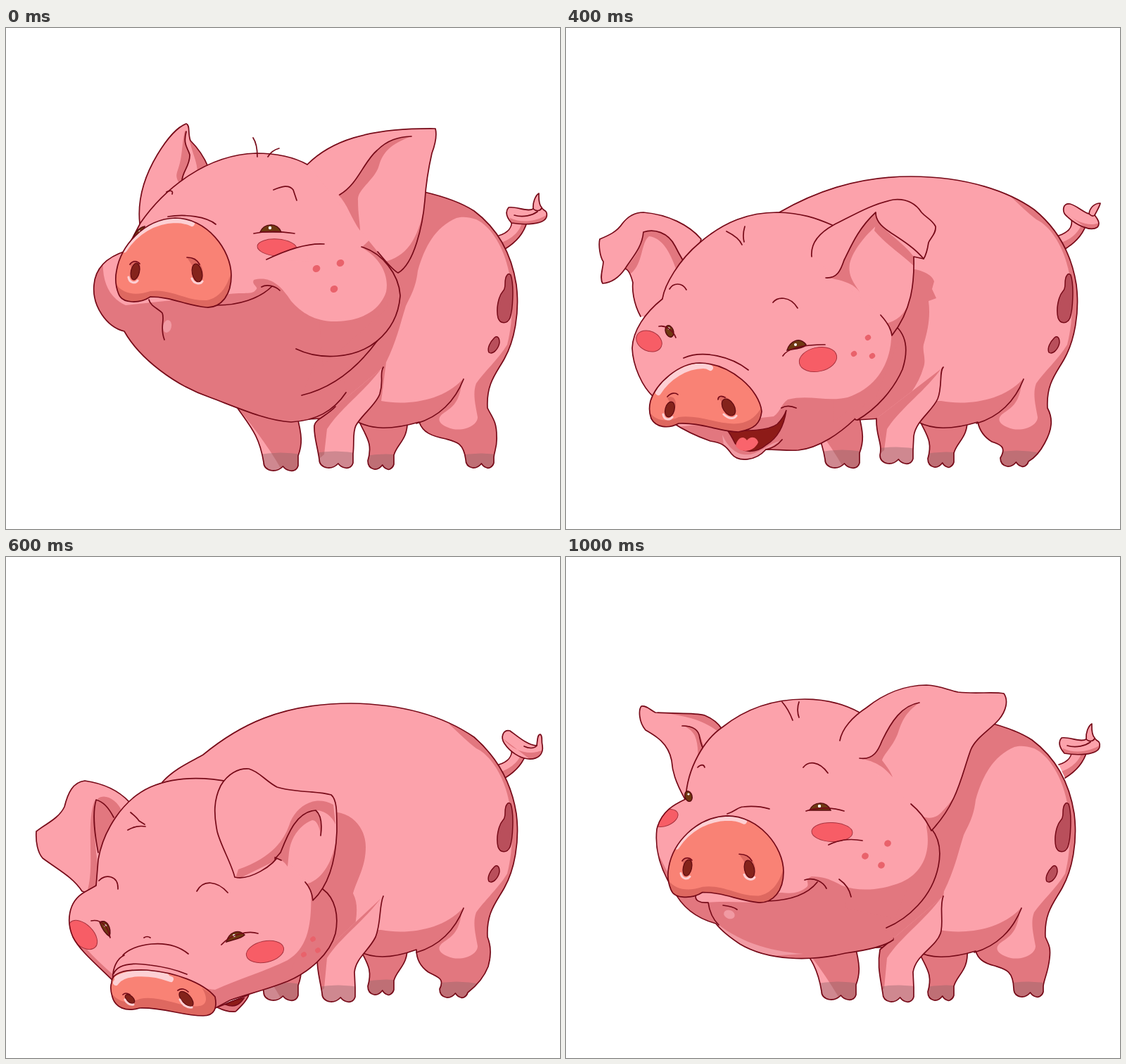
Write an HTML page that moves like this. It is 787 px wide and 712 px high and loops after 1200 ms.

```html
<!DOCTYPE html>
<html lang="en">
<head>
<meta charset="utf-8">
<title>Pig</title>
<style>
html, body { margin: 0; width: 100%; height: 100%; overflow: hidden; background: #fff; }
#strip { display: block; width: 4722px; height: 712px; animation: roll 1.2s steps(6) infinite; }
@keyframes roll { to { transform: translateX(-4722px); } }
.l { fill: #fca2ab; }
.d { fill: #e2777f; }
.k { fill: none; stroke: #760a18; stroke-width: 1.7; stroke-linecap: round; stroke-linejoin: round; }
.h { fill: #8b6367; opacity: .4; }
.spot { fill: #b94f5b; stroke: #760a18; stroke-width: 1.5; }
.blush { fill: #f75d66; stroke: #a8323e; stroke-width: 1; }
.freckle { fill: #e9626b; }
.eye { fill: #6f3912; stroke: #5a0c10; stroke-width: 1.5; }
.nose { fill: #f98275; }
.under { fill: #de6860; }
.hole { fill: #84231b; stroke: #650c12; stroke-width: 1.3; }
.mouth { fill: #8d1b18; stroke: #760a18; stroke-width: 1.5; }
.tongue { fill: #f9646c; }
.glint { fill: #fff; }
.pale { fill: #f19aa3; }
.shine { fill: none; stroke: #fdd0d4; stroke-width: 8; stroke-linecap: round; }
.curve { fill: none; stroke: #fdd0d4; stroke-width: 3; stroke-linecap: round; }
</style>
</head>
<body>
<svg id="strip" viewBox="0 0 4722 712"></svg>
<script>
let clips = 0;
const path = (c, d) => `<path class="${c}" d="${d}"/>`;
const ell = (c, x, y, rx, ry = rx, r = 0) =>
  `<ellipse class="${c}" cx="${x}" cy="${y}" rx="${rx}" ry="${ry}" transform="rotate(${r} ${x} ${y})"/>`;
const move = (x, y, s) => `<g transform="translate(${x} ${y})">${s}</g>`;

// Filled shapes with clipped shading; only the first two get an outline.
function part(base, shapes, shade = '') {
  const id = 'c' + clips++;
  const fills = shapes.map(d => path('', d)).join('');
  return `<clipPath id="${id}">${fills}</clipPath><g class="${base}">${fills}</g>` +
    `<g clip-path="url(#${id})">${shade}</g>` + path('k', shapes.slice(0, 2).join(''));
}

// Cloven foot, drawn from right to left.
const foot = (r, l, y) => {
  const w = r - l;
  return `L${r} ${y}c-2 7 -8 8 ${-.24 * w} 7q${-.12 * w} -1 ${-.2 * w} -6` +
    `q${-.14 * w} 7 ${-.32 * w} 6q${-.24 * w} -2 ${-.24 * w} -12`;
};
const hoof = (x, y) => path('h', `M${x} ${y}q35 -7 70 0v40h-70z`);
const freckles = (r, ...pts) => pts.map(([x, y]) => ell('freckle', x, y, r, r * .9, -30)).join('');

const farLeg = part('d',
  ['M413 550C421 580 421 592 415 608' + foot(415, 366, 622) + 'C359 575 345 565 322 530'],
  path('l', 'M322 530C345 560 375 595 398 640H350z') + hoof(355, 607));
const backLeg = part('d',
  ['M570 555C572 585 556 590 551 607' + foot(551, 514, 620) + 'C522 588 510 580 500 555'], hoof(505, 609));

const spots = path('spot', 'M712 351C706 358 712 368 706 374C699 382 696 400 699 412C702 421 712 421 716 412C720 400 722 365 717 351Q714 348 712 351Z') +
  path('spot', 'M694 440C688 446 683 455 686 461C692 465 700 455 701 447C701 440 698 437 694 440Z');

const stem = part('l', ['M700 295C713 291 720 283 718 272L740 276C736 290 727 303 709 314'],
  path('d', 'M734 270C733 290 715 302 700 306L715 320L745 275Z'));
const curls = {
  a: ['M714 255C708 262 712 270 718 277C735 280 765 280 768 268C770 258 762 260 761 255C756 250 757 240 757 235C752 238 748 248 749 257C740 262 725 253 714 255Z',
    'M716 270C735 279 757 273 769 265L765 282H715Z', 'M749 257C753 261 759 260 761 256M722 266C735 270 748 266 755 261'],
  b: ['M716 250C705 248 704 262 712 268C725 280 745 290 755 283C760 277 754 270 751 266C754 260 758 254 759 249C750 249 744 256 743 264C735 262 725 252 716 250Z',
    'M708 262C725 275 742 283 757 277L750 292Z', 'M743 264C746 267 749 268 751 266'],
  c: ['M716 247C706 245 702 256 708 265C716 277 730 286 742 287C756 288 764 280 762 268C760 260 763 255 759 252C755 252 755 260 754 268C742 268 728 256 716 247Z',
    'M706 258C722 277 745 283 763 274L750 292Z', 'M754 268C750 273 742 272 736 269']
};
const tail = (kind, x, y) => {
  const [d, shade, line] = curls[kind];
  return stem + move(x, y, part('l', [d], path('d', shade)) + path('k', line));
};

const HIGH = 'M560 228L594 233C620 239 645 247 665 260';
const MID = 'M303 262C350 235 410 211 490 211C570 211 630 233 665 258';
const LOW = 'M222 320C240 300 265 290 280 281C330 240 390 208 490 208C560 209 620 225 665 256';
const RUMP = 'C697 284 718 320 725 365C730 405 722 445 708 470C697 490 682 505 684 540';
const BELLY = 'C545 572 520 570 500 560L500 552L412 557L390 540';
const LIT = 'C570 537 620 530 648 500C645 525 640 535 625 545C608 555 615 565 635 570C655 573 670 563 670 553' +
  'C668 540 662 520 668 505C678 490 700 470 712 450C722 410 720 370 714 345C708 315 690 282 668 272';
const SHADED = 'M668 272C655 268 648 268 640 270C610 283 595 310 585 345C582 370 575 380 568 395C560 420 555 445 540 475L533 530';
const OPEN = 'M668 272C655 262 645 252 630 238V200H200V530H533';

function body(top, hind, hoofAt, cast) {
  return part('d', [top + RUMP + hind + BELLY],
    path('l', (cast ? OPEN : SHADED) + LIT + 'Z') + (cast ? path('d', cast) : '') + hoof(...hoofAt)) +
    path('k', 'M650 499C638 530 615 553 583 562') + spots;
}
const nearLeg = (right, r, l, y, left) => part('l',
  ['M536 482' + right + foot(r, l, y) + left],
  path('d', `M430 550L536 480C512 515 475 540 456 570L452 ${y - 12}L438 ${y}Z`) + hoof(l - 12, y - 13));

// Muzzle seen from below
const muzzle = part('nose',
  ['M157 345C163 310 195 272 240 270C285 270 320 315 320 352C320 380 305 398 285 397C255 394 235 382 205 382C190 392 165 392 160 378C156 368 155 355 157 345Z'],
  path('under', 'M155 362C165 379 185 381 205 374C235 370 255 388 285 387C302 384 313 370 319 350L325 405H150Z') +
  path('shine', 'M168 315C184 290 210 274 240 273C250 273 258 275 264 278')) +
  path('under', 'M176 336C180 326 192 330 191 342L186 357ZM257 326C272 322 284 342 279 358L266 340Z') +
  ell('hole', 183.5, 346, 6, 12, 12) + ell('hole', 271.5, 348, 7, 13, -12) +
  path('curve', 'M174 354C175 362 183 364 187 359M264 356C267 364 276 365 279 360') +
  path('k', 'M176 336C180 330 187 331 190 335M257 326C266 326 272 330 275 336');

const lidEye = path('eye', 'M361 290C366 277 385 276 391 290Z') + ell('glint', 375, 284, 2.2);

function headUp() {
  const farEar = part('l',
    ['M190 278C186 240 200 205 215 180C230 155 245 140 256 136C262 138 258 150 262 160C272 170 282 185 287 197L250 250'],
    path('d', 'M254 146C249 170 251 182 244 202C241 210 242 214 246 220L252 216C250 205 262 195 261 180C258 170 253 165 257 148ZM260 157C265 180 272 190 272 206L292 197Z')) +
    path('k', 'M256 147C251 165 258 170 261 180C262 195 250 205 250 217');
  const face = part('d', [
    'M483 518C465 545 440 558 405 560C370 558 330 540 290 525C240 508 190 470 168 431C143 425 122 395 125 365C127 340 145 325 170 317L191 277C225 228 285 180 355 178C385 178 410 184 428 194',
    'M505 311C535 320 558 350 560 380C558 410 545 430 527 445C505 475 470 510 420 522',
    'M428 194L560 250L556 347L540 400L450 480Z'],
    path('l', 'M138 325C135 365 150 385 170 394L318 378C335 375 350 380 355 372C360 368 348 365 352 358C375 352 390 365 405 388C420 405 440 418 470 417C500 416 530 405 540 375C545 350 530 325 505 312L570 250V150H180Z') +
    ell('pale', 229, 424, 6, 9, 12) + ell('blush', 385, 312, 28, 12, 4) +
    path('l', 'M370 329C385 321 400 315 425 309L430 332Z') + freckles(5.5, [441, 342], [475, 334], [466, 371])) +
    lidEye + path('eye', 'M180 303C180 292 190 283 197 282L194 291C190 298 185 300 180 303Z') + ell('glint', 190, 289, 1.5) +
    path('k', 'M352 292C375 287 395 290 410 292M370 329C395 317 425 305 452 307M380 230C392 225 402 222 408 230L413 245M228 233C233 230 238 231 236 236M357 183C357 170 355 162 351 156M372 183C376 176 381 173 388 171M230 268C255 264 285 268 298 279' +
      'M300 394C330 394 360 385 378 367M363 368C370 364 382 366 389 373M203 386C205 395 215 398 222 405C226 415 218 425 225 443M412 456C445 472 495 471 527 445');
  const ear = part('l',
    ['M428 194C460 162 510 142 610 143C613 155 608 170 605 178C600 200 596 230 595 245C592 280 580 335 557 348C548 343 540 332 528 318'],
    path('d', 'M594 255C585 300 570 325 535 333L557 352L580 330Z')) +
    path('d', 'M472 237C498 225 508 190 530 172C545 158 560 156 576 154C545 165 535 178 530 195C525 215 498 230 500 245C500 265 503 278 503 288C490 270 485 250 472 237Z') +
    path('k', 'M474 237C500 222 508 190 527 174C542 159 557 155 576 154');
  return [farEar, face + muzzle + ear];
}

function headLevel(jaw, cheek, crease) {
  const farEar = part('l',
    ['M172 345C158 320 154 305 153 290C148 265 130 255 116 247C106 235 106 218 110 213C118 212 122 218 130 222C160 224 185 222 200 226C212 231 220 238 225 246L200 290'],
    path('d', 'M168 240C190 240 195 255 200 276L185 310C192 290 192 270 186 255C182 247 175 243 168 240ZM125 219C160 227 190 226 220 250L230 240L200 222Z')) +
    path('k', 'M168 241C185 241 192 248 193 258C195 268 197 273 200 276');
  const face = part('d', [
    jaw + ' 173 345C175 300 200 260 225 243C260 215 300 203 342 203C375 203 400 211 420 222',
    cheek, 'M420 222L540 280L525 385L470 515L400 500Z'],
    path('l', 'M515 385C522 420 510 450 480 463C450 475 420 477 395 468C380 460 370 455 352 455C340 460 350 465 345 470C335 478 325 480 310 478L170 485C150 455 135 430 124 395L120 200H540Z') +
    path('l', 'M188 480C186 490 195 493 205 492C230 489 260 494 290 490L200 475Z') +
    path('pale', 'M212 517C245 547 290 561 340 565L260 570Z') +
    ell('pale', 235, 509, 8, 6, 20) + ell('blush', 381, 392, 29, 13.5, 2) + ell('blush', 144, 372, 19, 11, -22) +
    freckles(5, [428, 426], [460, 408], [451, 439])) +
    move(-12, 71, lidEye) + ell('eye', 177, 341, 5, 7.5, -15) + ell('glint', 177, 338, 1.6) +
    path('k', 'M344 362C362 356 383 357 398 362M376 410C392 402 408 401 424 404M340 300C347 291 362 290 375 308M190 300C195 295 199 296 200 300M310 207C317 215 322 225 325 233M334 207C331 215 332 224 334 229M232 366C245 362 247 356 255 356C275 354 285 357 292 359' +
      'M290 490C320 489 345 482 360 463M342 460C355 456 368 462 373 472M188 480C184 490 195 493 205 492C207 507 212 516 220 524M226 496C235 497 242 499 246 502' + crease);
  const ear = part('l',
    ['M392 262C395 245 410 228 430 215C455 195 485 183 515 183C535 184 545 190 560 193C585 196 610 192 625 195C632 205 628 220 618 232C605 247 585 258 578 275C565 310 560 350 522 390C515 375 505 362 493 352'],
    path('d', 'M579 272C573 310 560 340 538 362C530 371 522 374 510 370L522 395L560 350Z')) +
    path('d', 'M420 287C445 288 447 270 455 255C465 235 485 210 505 208C485 222 480 235 475 250C468 270 455 280 452 290C460 300 465 308 467 314C455 300 445 292 420 287Z') +
    path('k', 'M420 287C440 290 447 275 452 262C465 235 480 212 505 208');
  return [farEar, face + `<g transform="translate(-8 107) scale(1 .97)">${muzzle}</g>` + ear];
}

function headDown(left, cheek, dots, blushX) {
  const farEar = part('l',
    ['M106 410C95 390 94 370 95 362C92 350 88 343 84 342C75 355 65 362 52 363C47 355 53 340 53 332C48 325 46 308 48 300C60 295 72 290 80 278C90 265 100 262 110 262C145 265 175 280 192 300L165 400L135 412'],
    path('d', 'M84 342C100 325 108 308 111 290C125 284 143 290 155 310L167 332L157 345C147 315 135 298 118 296C106 305 110 335 92 349Z')) +
    path('k', 'M84 342C95 325 108 312 110 290C125 285 145 290 155 310C160 320 163 325 166 330');
  const face = part('d', [
    'M410 556C390 575 360 597 330 600C315 601 300 599 284 599C270 615 245 618 235 605C228 595 222 589 205 587C185 580 165 570 150 560L125 525' + left + 'C140 365 160 330 190 305C225 275 260 262 300 262C335 263 355 270 378 280',
    cheek, 'M378 280L490 300L475 440L440 525L400 545L380 560Z'],
    path('l', 'M462 425C465 470 445 510 400 525C370 532 345 520 315 528C305 535 305 545 295 552L130 570C122 520 105 495 85 470V250H500L490 340Z') +
    path('pale', 'M222 578C232 600 245 608 262 606C278 602 290 590 304 587L284 600L260 620L225 600Z') +
    ell('blush', 358, 471, 27, 17, -12) + ell('blush', blushX, 445, 19, 14, 25) + freckles(4.3, ...dots)) +
    path('mouth', 'M228 570C255 574 288 572 300 563C307 556 311 549 313 543C309 570 297 585 285 592C270 605 250 605 240 590C236 582 232 575 228 570Z') +
    path('tongue', 'M241 594C243 583 252 578 257 586C264 578 272 583 273 589C266 604 248 604 241 594Z') +
    path('eye', 'M314 458C318 445 332 438 341 450C338 455 325 456 314 458Z') + ell('glint', 326, 450, 2) +
    ell('eye', 147, 431, 5.5, 8.5, -20) + ell('glint', 146, 427, 1.7) +
    path('k', 'M308 466C315 455 335 450 368 450M132 424C142 422 152 430 156 440M294 390C300 382 318 380 329 398M147 371C152 362 165 361 171 372M228 289C240 295 247 301 250 308M254 282C251 292 252 300 253 304M167 469C195 457 235 467 259 486M306 540C313 536 320 537 327 540M284 599C295 597 303 590 307 585');
  const nose = part('nose',
    ['M120 530C128 505 160 476 190 476C235 477 275 515 278 545C276 562 268 570 245 574C220 574 190 560 160 562C145 570 128 568 121 555C118 547 118 538 120 530Z'],
    path('under', 'M118 545C128 560 145 560 160 553C190 549 220 565 245 562C262 560 272 550 278 538V580H118Z') +
    path('shine', 'M131 518C145 496 170 480 195 480C199 480 202 481 205 483')) +
    path('under', 'M144 526C152 520 160 530 154 543ZM216 526C228 517 246 538 240 550Z') +
    ell('hole', 147.5, 542, 6.5, 11, 15) + ell('hole', 231, 539, 8, 13, -32) +
    path('curve', 'M138 549C139 557 147 558 151 553M224 549C231 556 239 556 242 551') +
    path('k', 'M144 524C149 518 156 518 159 521M216 528C216 523 221 522 226 525');
  const ear = part('l',
    ['M349 325C347 305 362 290 380 280C410 265 435 250 465 244C485 242 497 250 505 262C512 270 520 272 525 282C526 292 518 298 515 305C513 318 510 325 508 328L494 325C495 360 492 400 463 437C462 428 458 420 447 408'],
    path('d', 'M442 270C450 290 475 300 494 325V338C475 320 455 308 438 288ZM494 360C489 395 480 414 454 420L463 440L500 385Z')) +
    path('d', 'M440 264C415 285 405 310 395 330C388 350 380 356 367 354C390 358 410 362 418 377C412 365 400 355 403 335C408 315 425 295 442 280Z') +
    path('k', 'M440 262C415 285 405 310 395 330C390 345 385 356 369 355M440 262C440 272 445 280 460 290C475 300 495 312 508 328');
  return [farEar, face + nose + ear];
}

function headLow() {
  const farEar = part('l',
    ['M175 348C160 332 140 322 112 318C95 320 88 335 83 355C75 372 55 380 43 390C42 405 45 420 52 428C75 445 95 455 108 475C115 478 124 478 128 466L150 440C165 410 175 380 175 348Z'],
    path('d', 'M128 345C140 348 147 360 150 375L132 420C126 400 122 365 128 345ZM126 345C112 385 128 440 114 480L135 470C130 440 122 380 126 345ZM130 344C140 335 158 345 165 362L145 385Z')) +
    path('k', 'M128 345C122 365 127 400 131 420M128 345C138 348 145 355 153 370');
  const face = part('d', [
    'M290 645L160 610C130 580 105 560 95 540C86 520 87 490 112 476L128 467L131 430C138 390 165 345 205 327C240 312 280 312 320 320',
    'M450 472C468 485 473 510 468 535C460 565 430 590 400 603C370 615 340 622 318 630L290 645',
    'M320 320L440 350L450 475L400 600L290 640Z'],
    path('l', 'M433 470C435 520 430 555 400 573C370 588 330 600 297 615L160 600C130 575 110 555 85 520V290H450Z') +
    ell('blush', 368, 561, 27, 15, -12) + ell('blush', 109, 537, 25, 15, 45) +
    freckles(4, [436, 543], [423, 565], [443, 559])) +
    path('eye', 'M313 547C317 533 330 528 339 537C335 542 325 543 313 547Z') + ell('glint', 324, 538, 2) +
    path('eye', 'M133 519C144 514 150 528 147 539C140 535 136 527 133 519Z') + ell('glint', 141, 524, 1.8) +
    path('k', 'M306 551C320 535 345 531 358 535M121 517C135 514 145 525 148 541M271 475C280 458 300 460 315 477M132 460C140 450 160 452 159 472M177 363C183 368 187 372 189 375L197 380M173 388C183 382 192 382 198 383M166 566C180 550 230 540 259 564M196 541C199 539 202 539 205 541M152 604C150 585 158 570 168 566M153 592C160 576 185 577 205 580C230 583 245 588 257 593');
  const chin = part('d', ['M300 640L345 622C342 632 330 642 326 646C318 647 308 644 300 640Z']) +
    path('mouth', 'M312 636C320 630 330 629 338 627C332 636 325 641 312 636Z');
  const nose = part('nose',
    ['M150 605C150 590 170 586 200 587C240 590 280 605 297 625C300 640 297 652 280 652C250 652 225 640 190 641C170 647 155 640 151 625C148 615 148 610 150 605Z'],
    path('under', 'M148 618C162 636 175 634 190 628C220 622 250 642 275 638C288 636 285 622 278 612L305 630V660H148Z') +
    path('shine', 'M156 605C165 589 205 589 234 600M158 599C175 589 205 590 228 596')) +
    ell('hole', 176, 628, 8, 4.5, 42) + ell('hole', 256, 628, 13, 6.5, 48) +
    path('curve', 'M169 629C171 634 176 637 181 636M247 629C250 636 257 641 264 640') +
    path('k', 'M166 622C169 619 173 620 176 622M244 616C249 612 255 614 259 618');
  const ear = part('l',
    ['M390 420C380 440 345 460 325 455C320 435 305 410 300 390C295 365 295 345 305 325C315 308 330 300 345 301C360 305 368 318 385 327C410 335 440 332 462 338C470 345 470 360 470 390C468 440 455 470 436 488C435 478 432 470 425 462'],
    path('d', 'M470 395C466 430 450 460 425 465L437 492L475 440ZM465 352C440 338 415 352 404 376C398 395 385 425 330 444L325 460L390 428C400 395 415 365 440 360C455 360 465 372 468 380Z')) +
    path('d', 'M388 423C398 395 415 362 440 360C448 370 449 385 447 396C445 380 440 374 435 374C420 380 405 395 402 420L400 440C395 432 388 428 380 428Z') +
    path('k', 'M390 420C400 395 412 362 440 360C448 367 449 382 447 396M390 420L382 429M382 427L391 431');
  return [farEar, face + chin + nose + ear];
}

const pig = ([farEar, head], tl, [fx, fy], by, torso, leg) =>
  farEar + tl + move(fx, fy, farLeg) + move(0, by, backLeg) + torso + leg + head;

const castMid = 'M490 342C505 344 520 350 523 360L520 371L526 384L515 388C518 410 514 430 508 450C506 460 512 470 508 482C500 510 480 535 450 560L380 570L440 342Z';
const castLow = 'M450 363C490 356 511 385 511 412C511 440 500 455 493 478C502 495 497 515 495 530C480 560 460 570 440 585L380 570Z';
const hindLevel = 'C688 550 692 553 690 570C688 590 682 600 681 610' + foot(681, 639, 618) + 'C638 588 628 586 612 581C595 577 588 570 585 560';
const hindMid = 'C692 555 691 570 680 590C672 605 664 612 657 616' + foot(657, 617, 616) + 'C626 596 618 592 605 588C592 580 587 570 585 560';
const hindLow = 'C688 550 690 565 685 582C678 600 665 612 656 619' + foot(656, 616, 619) + 'C624 598 612 597 600 590C590 583 583 572 583 558';

const poses = [
  pig(headUp(), tail('a', 0, 0), [0, 0], 0,
    body(HIGH, 'C690 553 697 558 697 580C698 595 694 600 693 610' + foot(693, 653, 618) + 'C650 590 640 588 625 584C605 580 592 575 587 560', [640, 608]),
    nearLeg('C530 492 537 500 531 520C526 535 505 550 497 565C492 575 495 590 493 605', 493, 445, 618, 'C442 592 437 580 438 565C440 555 455 552 468 538')),
  pig(headLevel('M468 545C455 555 430 562 400 564C350 567 290 565 250 545C235 537 222 528 216 522C190 515 165 500 148 473C128 445 120 415 124 388C130 362 150 352',
    'M522 385L532 378C546 398 547 430 535 460C522 500 485 522 455 524C430 525 410 520 392 512', 'M418 539C428 532 438 528 455 524'),
    tail('a', -2, 11), [0, 0], -6,
    body(HIGH, hindLevel, [625, 607]),
    nearLeg('C530 492 535 515 531 540C528 550 495 555 491 570C490 580 497 590 499 605', 499, 453, 615, 'C455 590 438 585 438 560L468 540')),
  pig(headDown('C108 510 95 480 94 455C95 430 112 405 137 385', 'M470 425C485 440 486 460 478 485C465 515 440 542 414 557',
    [[409, 463], [429, 440], [435, 466]], 118),
    tail('b', 0, 0), [2, -4], -3,
    body(MID, hindMid, [605, 604], castMid),
    nearLeg('C530 487 535 510 528 527C520 545 497 558 494 580L493 600', 493, 446, 612, 'C450 590 440 580 441 555')),
  pig(headLow(), tail('c', 0, 0), [0, 1], -5,
    body(LOW, hindLow, [605, 607], castLow),
    nearLeg('C530 495 533 520 525 540C515 560 497 570 495 590L496 612', 496, 449, 625, 'C446 600 442 590 442 570')),
  pig(headDown('C108 510 90 485 89 455C90 430 108 412 132 405', 'M470 428C492 445 494 475 485 497C465 530 430 543 396 545',
    [[406, 482], [426, 459], [430, 480]], 116),
    tail('c', -2, -2), [2, -4], -3,
    body(MID, hindMid, [605, 604], castMid),
    nearLeg('C530 487 535 510 527 530C520 548 495 560 493 580L494 605', 494, 449, 618, 'C446 585 442 575 445 553')),
  pig(headLevel('M468 545C455 555 430 560 400 564C350 576 290 575 250 551C235 541 222 530 216 522C190 515 168 500 155 473C137 445 129 415 132 388C138 362 158 352',
    'M522 387C545 415 532 465 503 496C491 509 475 521 458 528', 'M391 459C401 466 406 474 408 484').map(s => move(-3, -1, s)),
    tail('a', -10, 2), [-3, 0], 3,
    move(-3, 0, body(HIGH, hindLevel, [625, 607])),
    nearLeg('C530 495 537 520 532 535C525 555 497 565 493 590L494 612', 494, 450, 625, 'C446 595 442 580 446 558L465 542'))
];
document.getElementById('strip').innerHTML = poses.map((p, i) => move(i * 787, 0, p)).join('');
</script>
</body>
</html>
```
